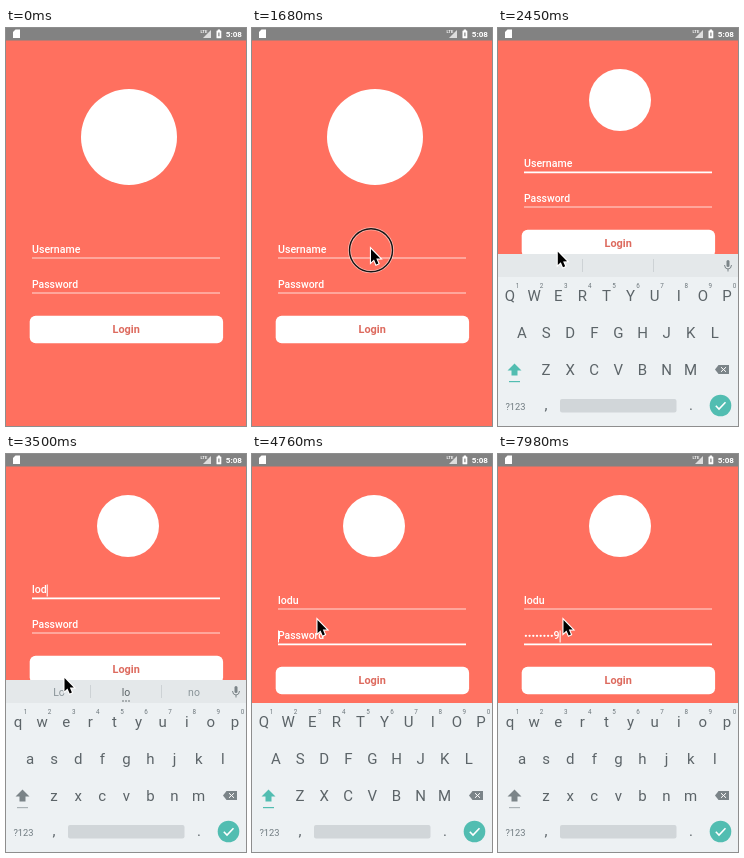
These frames come from a looping animation (240x398 px, 8 s). An HTML page with a canvas:

```html
<!DOCTYPE html>
<html lang="en">
<head>
<meta charset="utf-8">
<title>Login screen</title>
<style>
html, body { margin: 0; width: 100%; height: 100%; overflow: hidden; }
canvas { display: block; width: 240px; height: 398px; }
</style>
</head>
<body>
<canvas id="stage"></canvas>
<script>
const W = 240, H = 398, LOOP = 8000;
const CORAL = '#ff705f', TEAL = '#52bdb1', INK = '#5c6468', ICON = '#7b8488';
const canvas = document.getElementById('stage');
const ctx = canvas.getContext('2d');
const ratio = window.devicePixelRatio || 1;
canvas.width = W * ratio;
canvas.height = H * ratio;

const USER = 'lodu';
const userTimes = [2940, 3220, 3360, 3570];
const passTimes = [5460, 5810, 5950, 6230, 6510, 6860, 7140, 7350, 7700];
// time, x, y of the pointer tip
const pointerPath = [
  [70, 240, 373], [840, 132, 236], [1120, 119, 221], [1820, 119, 221],
  [2100, 76.5, 221], [2520, 58.5, 224], [3780, 58.5, 224], [4340, 65.5, 166]
];

const clamp = v => Math.max(0, Math.min(1, v));
const progress = (t, a, b) => clamp((t - a) / (b - a));
const ease = p => p * p * (3 - 2 * p);
const mix = (a, b, p) => a + (b - a) * p;
const countBefore = (times, t) => times.filter(x => x <= t).length;

function rect(x, y, w, h, color, r = 0) {
  ctx.fillStyle = color;
  ctx.beginPath();
  ctx.roundRect(x, y, w, h, r);
  ctx.fill();
}

function disc(x, y, r, color) {
  ctx.fillStyle = color;
  ctx.beginPath();
  ctx.arc(x, y, r, 0, 7);
  ctx.fill();
}

function trace(points) {
  ctx.beginPath();
  points.forEach(([x, y]) => ctx.lineTo(x, y));
}

function shape(points, color) {
  ctx.fillStyle = color;
  trace(points);
  ctx.fill();
}

function line(points, color, width) {
  ctx.strokeStyle = color;
  ctx.lineWidth = width;
  trace(points);
  ctx.stroke();
}

function text(s, x, y, size, color, align = 'left', weight = 400) {
  ctx.font = `${weight} ${size}px Roboto, sans-serif`;
  ctx.textAlign = align;
  ctx.fillStyle = color;
  ctx.fillText(s, x, y);
  return ctx.measureText(s).width;
}

function statusBar() {
  rect(0, 0, W, 12.5, '#828282');
  shape([[9.5, 1.5], [14, 1.5], [14, 10], [7, 10], [7, 4]], '#fff');
  text('LTE', 194.5, 4.8, 4.2, '#fff', 'left', 700);
  shape([[205, 2], [205, 10], [197, 10]], '#ddd');
  rect(210.5, 2.5, 4.8, 7.8, '#fff', 0.6);
  rect(211.8, 1.5, 2.2, 1.5, '#fff');
  rect(212.3, 4.5, 1.2, 3.8, '#828282');
  text('5:08', 236, 9.2, 8.1, '#fff', 'right', 700);
}

function caret(x, y, since, t) {
  if ((t - since) % 1000 < 500) rect(x, y - 9.5, 1, 12, '#fff');
}

function underline(y, focused) {
  rect(26, y - 0.4, 188, focused ? 1.6 : 1, focused ? '#fff' : '#ffdcd7');
}

function userField(t, y) {
  const n = countBefore(userTimes, t);
  const focused = t >= 1890 && t < 4620;
  const width = text(n ? USER.slice(0, n) : 'Username', 26, y - 0.6, 10.6, '#fff', 'left', 500);
  if (focused) caret(n ? 26 + width : 26, y, n ? userTimes[n - 1] : 1890, t);
  underline(y + 4, focused);
}

function passwordField(t, y) {
  const n = countBefore(passTimes, t);
  const focused = t >= 4620;
  let x = 26;
  if (n) {
    for (let i = 1; i < n; i++, x += 3.7) disc(x + 1.9, y - 4.2, 1.15, '#fff');
    x += text(n, x, y - 0.6, 10.6, '#fff', 'left', 500);
  } else {
    text('Password', 26, y - 0.6, 10.4, '#fff', 'left', 500);
  }
  if (focused) caret(x, y, n ? passTimes[n - 1] : 4690, t);
  underline(y + 4, focused);
}

function form(t) {
  const p = ease(progress(t, 2110, 2380));
  const y = t < 4690 ? mix(226, 140, p) : 151;
  rect(0, 12, W, H, CORAL);
  disc(mix(123, 122, p), mix(109, 72, p), mix(48, 31, p), '#fff');
  userField(t, y);
  passwordField(t, y + 35);
  rect(23.7, y + 61.7, 193.4, 27.5, '#fff', 6);
  text('Login', 120.2, y + 79.3, 10.9, '#dd6a5e', 'center', 700);
}

function suggestions(t) {
  rect(0, 226, W, 23, '#e4e8ea');
  [84, 155].forEach(x => rect(x, 231, 1, 13, '#cdd2d5'));
  rect(228.5, 232, 3, 7, ICON, 1.5);
  line([[226.5, 237], [227.5, 240], [230, 241], [232.5, 240], [233.5, 237]], ICON, 1);
  line([[230, 241], [230, 243.5]], ICON, 1);
  if (t < 3080) return;
  const words = t < 3640 ? ['Lo', 'lo', 'no'] : ['Lodu', 'lodu', 'loud'];
  words.forEach((w, i) =>
    text(w, [53, 120, 188][i], 242, 10.5, i === 1 ? INK : '#8a9499', 'center'));
  [117, 120, 123].forEach(x => disc(x, 247, 0.8, INK));
}

function keyRow(letters, x0, y, upper) {
  [...letters].forEach((c, i) =>
    text(upper ? c.toUpperCase() : c, x0 + i * 24.1, y, 15, INK, 'center'));
}

function keyboard(t) {
  const upper = t < 2940 || (t >= 4690 && t < 5460);
  const p = progress(t, 1960, 2240);
  ctx.save();
  ctx.globalAlpha = clamp(p * 1.45);
  ctx.translate(0, 32 * (1 - p));
  rect(0, 249, W, H - 249, '#edf1f3');
  if (t < 4690) suggestions(t);

  keyRow('qwertyuiop', 12, 273, upper);
  keyRow('asdfghjkl', 24, 310, upper);
  keyRow('zxcvbnm', 48, 347, upper);
  [...'1234567890'].forEach((c, i) =>
    text(c, 19.5 + i * 24.1, 259.5, 6.3, '#6d777c', 'center'));

  const shift = upper ? TEAL : ICON;
  shape([[16.5, 335.5], [23.5, 342.5], [19.5, 342.5], [19.5, 347.5],
    [13.5, 347.5], [13.5, 342.5], [9.5, 342.5]], shift);
  rect(11, 353, 11, 1.2, upper ? TEAL : '#aab2b6');

  shape([[217, 341.5], [220.5, 337], [231, 337], [231, 346], [220.5, 346]], ICON);
  line([[223, 339.2], [228, 343.8]], '#fff', 1);
  line([[228, 339.2], [223, 343.8]], '#fff', 1);

  text('?123', 17.5, 381.5, 9.3, '#707b80', 'center');
  text(',', 48, 382, 15, INK, 'center');
  rect(62, 371, 116.5, 13.5, '#d1d6d9', 2);
  text('.', 193, 382, 15, INK, 'center');
  disc(222.5, 377.5, 10.8, TEAL);
  line([[217.8, 377.8], [221, 381], [227.5, 374.3]], '#fff', 1.6);
  ctx.restore();
}

function pointerAt(t) {
  const i = pointerPath.findIndex(k => k[0] > t);
  if (i < 0) return pointerPath.at(-1).slice(1);
  const [t0, x0, y0] = pointerPath[i - 1], [t1, x1, y1] = pointerPath[i];
  const p = ease(progress(t, t0, t1));
  return [mix(x0, x1, p), mix(y0, y1, p)];
}

function clickRing(x, y, t, start, end) {
  if (t < start || t >= end) return;
  ctx.globalAlpha = progress(t, start - 70, start + 140) * (1 - progress(t, end - 70, end));
  [['#ffffff88', 3], ['#151515', 1.4]].forEach(([color, width]) => {
    ctx.strokeStyle = color;
    ctx.lineWidth = width;
    ctx.beginPath();
    ctx.arc(x, y + 1.3, 21.5, 0, 7);
    ctx.stroke();
  });
  ctx.globalAlpha = 1;
}

function pointer(t) {
  if (t < 70) return;
  const [x, y] = pointerAt(t);
  clickRing(x, y, t, 1470, 1820);
  clickRing(x, y, t, 4410, 4690);
  ctx.save();
  ctx.translate(x, y);
  trace([[0, 0], [0, 13.2], [3, 10.4], [5.2, 15.5], [7.4, 14.5], [5.3, 9.6], [9.3, 9.4]]);
  ctx.closePath();
  ctx.lineWidth = 2.2;
  ctx.strokeStyle = '#fff';
  ctx.stroke();
  ctx.fillStyle = '#000';
  ctx.fill();
  ctx.restore();
}

function draw(t) {
  ctx.setTransform(ratio, 0, 0, ratio, 0, 0);
  form(t);
  if (t >= 1960) {
    const top = t < 4690 ? 226 : 249;
    rect(0, top, W, H - top, '#fff');
    keyboard(t);
  }
  statusBar();
  pointer(t);
}

const start = performance.now();
function tick() {
  draw((performance.now() - start) % LOOP);
  requestAnimationFrame(tick);
}
tick();
</script>
</body>
</html>
```
